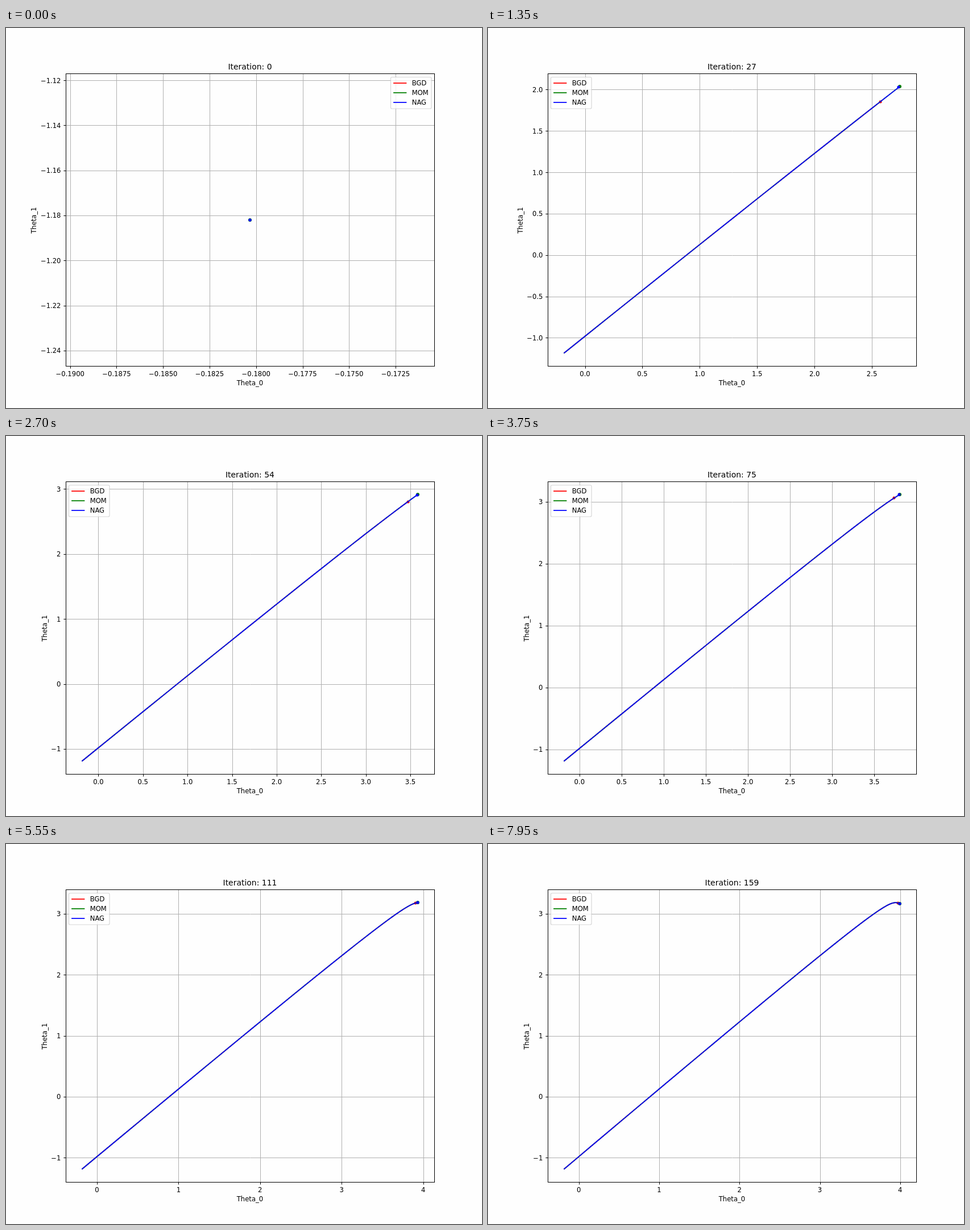
An HTML page with a canvas for the animation above (8000 ms loop, 837 by 669 pixels).

```html
<!DOCTYPE html>
<html lang="en">
<head>
<meta charset="utf-8">
<title>Gradient descent paths</title>
<style>
  html, body { margin: 0; width: 100%; height: 100%; overflow: hidden; background: #fefefe; }
  canvas { display: block; }
</style>
</head>
<body>
<canvas id="stage" width="837" height="669"></canvas>
<script>
const ctx = document.getElementById('stage').getContext('2d');
const W = 837, H = 669, FIGURE_H = 669.6, PT = 83.7 / 72;
const FONT = '"DejaVu Sans", sans-serif';
const STEP_MS = 50, STEPS = 160;
const box = { left: W * .125, right: W * .9, top: H - FIGURE_H * .88, bottom: H - FIGURE_H * .11 };

// Least squares cost: y = theta0 + theta1 * x, described by the moments of x.
const START = [-.18033, -1.18189], BEST = [4.22215, 2.96847];
const MEAN = .94558, MEAN_SQ = 1.2266, RATE = .01, MOMENTUM = .105;

function gradient([p, q]) {
  const dp = p - BEST[0], dq = q - BEST[1];
  return [2 * (dp + MEAN * dq), 2 * (MEAN * dp + MEAN_SQ * dq)];
}

function descend(momentum, lookAhead) {
  const path = [START];
  let speed = [0, 0];
  for (let i = 1; i < STEPS; i++) {
    const at = path[i - 1];
    const g = gradient(at.map((v, k) => v - lookAhead * speed[k]));
    speed = speed.map((v, k) => momentum * v + RATE * g[k]);
    path.push(at.map((v, k) => v - speed[k]));
  }
  return path;
}

const series = [
  { name: 'BGD', color: '#ff0000', radius: 2.5, path: descend(0, 0) },
  { name: 'MOM', color: '#008000', radius: 3, path: descend(MOMENTUM, 0) },
  { name: 'NAG', color: '#0000ff', radius: 2.6, path: descend(MOMENTUM, MOMENTUM) }
];

const snap = v => Math.floor(v + .5) + .5;

function limits(axis, count) {
  const values = series.flatMap(s => s.path.slice(0, count + 1).map(p => p[axis]));
  let lo = Math.min(...values), hi = Math.max(...values);
  if (lo === hi) {
    const pad = Math.abs(lo) * .05;
    lo -= pad;
    hi += pad;
  }
  const margin = (hi - lo) * .05;
  return [lo - margin, hi + margin];
}

function ticks([lo, hi]) {
  const raw = (hi - lo) / 9;
  const power = 10 ** Math.floor(Math.log10(raw));
  const step = power * [1, 2, 2.5, 5, 10].find(m => m * power >= raw);
  let digits = 0;
  while (Math.abs(step * 10 ** digits - Math.round(step * 10 ** digits)) > 1e-6) digits++;
  const list = [];
  for (let n = Math.ceil(lo / step); n * step <= hi; n++) {
    const label = Math.abs(n * step).toFixed(digits);
    list.push({ value: n * step, label: (n < 0 ? '\u2212' : '') + label });
  }
  return list;
}

function line(x1, y1, x2, y2, color, width) {
  ctx.strokeStyle = color;
  ctx.lineWidth = width;
  ctx.beginPath();
  ctx.moveTo(x1, y1);
  ctx.lineTo(x2, y2);
  ctx.stroke();
}

function text(str, x, y, align = 'center', size = 10) {
  ctx.font = `${size * PT}px ${FONT}`;
  ctx.textAlign = align;
  ctx.fillStyle = '#000';
  ctx.fillText(str, x, Math.round(y));
}

function drawSeries(s, count, toX, toY) {
  ctx.strokeStyle = ctx.fillStyle = s.color;
  ctx.lineWidth = 1.5 * PT;
  ctx.lineJoin = 'round';
  ctx.lineCap = 'square';
  if (count > 0) {
    ctx.beginPath();
    s.path.slice(0, count + 1).forEach(p => ctx.lineTo(toX(p[0]), toY(p[1])));
    ctx.stroke();
  }
  const [p, q] = s.path[count];
  ctx.beginPath();
  ctx.arc(Math.round(toX(p)), Math.round(toY(q)), s.radius, 0, 2 * Math.PI);
  ctx.fill();
  ctx.lineCap = 'butt';
}

function drawLegend(x) {
  ctx.beginPath();
  ctx.roundRect(x, 86.5, 71.5, 55.5, 2.3);
  ctx.fillStyle = 'rgba(255,255,255,.8)';
  ctx.fill();
  ctx.strokeStyle = 'rgba(204,204,204,.8)';
  ctx.lineWidth = PT;
  ctx.stroke();
  series.forEach((s, i) => {
    const y = 97 + i * 17;
    line(x + 4.6, y, x + 27.9, y, s.color, 1.5 * PT);
    text(s.name, x + 37.2, y + 4, 'left');
  });
}

function draw(count) {
  const xLim = limits(0, count), yLim = limits(1, count);
  const toX = v => box.left + (v - xLim[0]) / (xLim[1] - xLim[0]) * (box.right - box.left);
  const toY = v => box.bottom - (v - yLim[0]) / (yLim[1] - yLim[0]) * (box.bottom - box.top);
  const xTicks = ticks(xLim), yTicks = ticks(yLim);
  const left = snap(box.left), right = snap(box.right);
  const top = snap(box.top), bottom = snap(box.bottom);
  const tick = 3.5 * PT, labelRight = box.left - 2 * tick;

  ctx.fillStyle = '#fefefe';
  ctx.fillRect(0, 0, W, H);

  for (const t of xTicks) {
    const x = snap(toX(t.value));
    line(x, top, x, bottom, '#b0b0b0', 1);
    line(x, bottom, x, bottom + tick, '#000', 1);
    text(t.label, toX(t.value), 613);
  }
  let labelWidth = 0;
  for (const t of yTicks) {
    const y = snap(toY(t.value));
    line(left, y, right, y, '#b0b0b0', 1);
    line(left - tick, y, left, y, '#000', 1);
    text(t.label, labelRight, toY(t.value) + 4.4, 'right');
    labelWidth = Math.max(labelWidth, ctx.measureText(t.label).width);
  }

  ctx.save();
  ctx.beginPath();
  ctx.rect(box.left, box.top, box.right - box.left, box.bottom - box.top);
  ctx.clip();
  series.forEach(s => drawSeries(s, count, toX, toY));
  ctx.restore();

  ctx.strokeStyle = '#000';
  ctx.lineWidth = 1;
  ctx.strokeRect(left, top, right - left, bottom - top);

  const middle = (box.left + box.right) / 2;
  text(`Iteration: ${count}`, middle, 73, 'center', 12);
  text('Theta_0', middle, 629);
  ctx.save();
  ctx.translate(Math.round(labelRight - labelWidth - 7.6), (box.top + box.bottom) / 2 + 1);
  ctx.rotate(-Math.PI / 2);
  text('Theta_1', 0, 0);
  ctx.restore();

  drawLegend(count === 0 ? 676.5 : 110.5);
}

let shown = -1;
function tickFrame() {
  const count = Math.floor(performance.now() / STEP_MS) % STEPS;
  if (count !== shown) draw(shown = count);
  requestAnimationFrame(tickFrame);
}
tickFrame();
</script>
</body>
</html>
```
